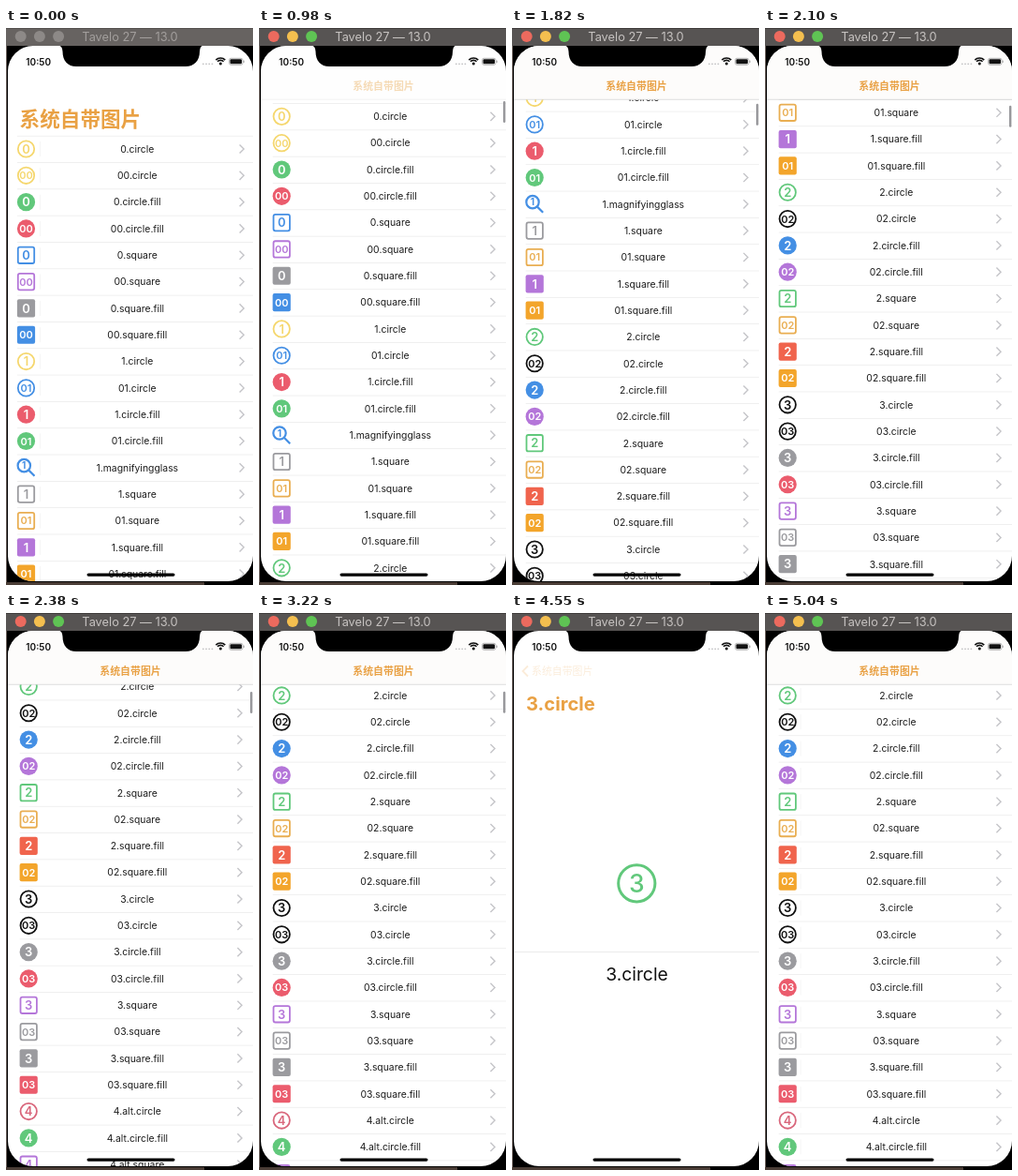
Recreate the animation shown at these times as an HTML page with a canvas. Size 264x594 px, loop 5.11 s.

```html
<!DOCTYPE html>
<html lang="zh">
<head>
<meta charset="utf-8">
<style>
html, body { margin: 0; width: 100%; height: 100%; overflow: hidden; background: #000; }
canvas { display: block; width: 264px; height: 594px; }
</style>
</head>
<body>
<canvas id="stage"></canvas>
<script>
const W = 264, H = 594, LOOP = 5110, STEP = 70;
const PITCH = 28.32, FIRST = 129, TAPPED = 25, ORANGE = '#e9a144';
const TITLE = '系统自带图片';
const LATIN = 'Inter, "Liberation Sans", sans-serif';
const CJK = '"Noto Sans CJK SC", "Noto Sans CJK", sans-serif';
const COLORS = {
  y: '#f5d76e', g: '#61c87b', r: '#eb5c6d', b: '#448fe4', p: '#b476d9', a: '#9b9b9f',
  o: '#e9ae52', O: '#f3a52b', v: '#f0644d', k: '#111', c: '#d9677c'
};
const PALETTE = 'yygrbpabybrgbaopOgkbpgovOkkarpaarcgpo';

const canvas = document.getElementById('stage');
const ctx = canvas.getContext('2d');
const dpr = window.devicePixelRatio || 1;
canvas.width = W * dpr;
canvas.height = H * dpr;
ctx.scale(dpr, dpr);

// Symbol list: each digit plain and zero-padded, in four shapes
const names = [];
for (let d = 0; d < 4; d++) {
  for (const shape of ['circle', 'circle.fill', 'square', 'square.fill']) {
    names.push(`${d}.${shape}`, `0${d}.${shape}`);
    if (d === 1 && shape === 'circle.fill') names.push('1.magnifyingglass');
  }
}
for (const shape of ['circle', 'circle.fill', 'square', 'square.fill']) names.push('4.alt.' + shape);

const clamp = (v, a = 0, b = 1) => Math.min(b, Math.max(a, v));
const ramp = (t, a, b) => clamp((t - a) / (b - a));
const easeOut = u => 1 - (1 - u) ** 3;

// Time, offset and speed (px/ms) at points of the drag
const DRAG = [[560, 0, 0], [1400, 126, .27], [1820, 281, .41], [2380, 532, 0], [3010, 522.5, 0]];
function scrollAt(t) {
  if (t <= DRAG[0][0]) return 0;
  for (let i = 1; i < DRAG.length; i++) {
    const [t0, y0, v0] = DRAG[i - 1], [t1, y1, v1] = DRAG[i];
    if (t > t1) continue;
    const d = t1 - t0, u = (t - t0) / d, w = 1 - u;
    return y0 * (1 + 2 * u) * w * w + v0 * d * u * w * w + y1 * u * u * (3 - 2 * u) - v1 * d * u * u * w;
  }
  return DRAG[DRAG.length - 1][1];
}

function rect(x, y, w, h, color) {
  ctx.fillStyle = color;
  ctx.fillRect(x, y, w, h);
}

function pill(x, y, w, h, r, color) {
  ctx.beginPath();
  ctx.roundRect(x, y, w, h, r);
  ctx.fillStyle = color;
  ctx.fill();
}

function dot(x, y, r, color) {
  ctx.beginPath();
  ctx.arc(x, y, r, 0, 7);
  ctx.fillStyle = color;
  ctx.fill();
}

function line(points, color, width) {
  ctx.beginPath();
  points.forEach(([x, y]) => ctx.lineTo(x, y));
  ctx.strokeStyle = color;
  ctx.lineWidth = width;
  ctx.stroke();
}

// Text centred vertically on the digit or ideograph height
function text(str, x, y, size, color, { weight = 400, align = 'center', family = LATIN } = {}) {
  ctx.font = `${weight} ${size}px ${family}`;
  ctx.textAlign = align;
  ctx.fillStyle = color;
  ctx.fillText(str, x, y + size * .365);
}

function faded(alpha, draw) {
  if (alpha <= 0) return;
  ctx.save();
  ctx.globalAlpha *= alpha;
  draw();
  ctx.restore();
}

function icon(name, x, y, color) {
  const digits = name.split('.')[0], fill = name.endsWith('fill');
  const lens = name.includes('magnifying');
  const size = digits.length > 1 ? 11 : 13;
  ctx.save();
  ctx.translate(x, y);
  ctx.beginPath();
  if (lens) {
    ctx.arc(-2.2, -2.2, 6.7, 0, 7);
    ctx.moveTo(2.8, 2.8);
    ctx.lineTo(9, 9);
  } else if (name.includes('circle')) {
    ctx.arc(0, 0, fill ? 9.6 : 8.7, 0, 7);
  } else {
    const r = fill ? 9.6 : 8.7;
    ctx.roundRect(-r, -r, 2 * r, 2 * r, 2);
  }
  ctx.fillStyle = ctx.strokeStyle = color;
  ctx.lineWidth = lens ? 2.2 : 1.8;
  fill ? ctx.fill() : ctx.stroke();
  if (lens) text(digits, -2.4, -2.2, 10, color, { weight: 700 });
  else text(digits, 0, 0, size, fill ? '#fff' : color, { weight: 600 });
  ctx.restore();
}

function list(t, scroll, highlight) {
  const settled = t < 560 || t > 4900;
  const shift = 2.7 * ramp(scroll, 0, 4);
  const navBottom = Math.max(76, 114 - scroll);
  rect(0, 0, W, H, '#fff');
  ctx.save();
  ctx.beginPath();
  ctx.rect(0, navBottom, W, H);
  ctx.clip();
  rect(12 + shift, FIRST - PITCH / 2 - scroll, W, .7, '#e9e9e9');
  names.forEach((name, i) => {
    const y = FIRST + i * PITCH - scroll;
    if (y < 50 || y > 615) return;
    if (i === TAPPED) faded(highlight, () => rect(0, y - PITCH / 2, W, PITCH, '#d9d9dd'));
    icon(name, 21.5 + shift, y, COLORS[PALETTE[i]]);
    if (settled) rect(36 + shift * .6, y - 8, 1, 16, '#f5f5f5');
    text(name, 140.3, y, 10.4, '#1c1c1c');
    const cx = 252 - shift * .8;
    line([[cx - 2.4, y - 4.6], [cx + 2.2, y], [cx - 2.4, y + 4.6]], '#c5c5c9', 1.4);
    rect(12 + shift, y + PITCH / 2, W, .7, '#e9e9e9');
  });
  ctx.restore();
  faded(ramp(t, 560, 700) * (1 - ramp(t, 3220, 3430)), () =>
    pill(261, 77.5 + scroll * .012, 2.4, 23, 1.2, '#98989c'));
  // Large title slides away under the bar
  ctx.save();
  ctx.beginPath();
  ctx.rect(0, 76, W, H);
  ctx.clip();
  if (scroll < 40) text(TITLE, 14.6, 97 - scroll, 21.6, ORANGE, { weight: 700, align: 'left', family: CJK });
  ctx.restore();
}

function detail() {
  rect(0, 0, W, H, '#fff');
  text('3.circle', 15, 97, 20.2, ORANGE, { weight: 700, align: 'left' });
  ctx.beginPath();
  ctx.arc(133.3, 288.3, 19.6, 0, 7);
  ctx.strokeStyle = COLORS.g;
  ctx.lineWidth = 3;
  ctx.stroke();
  text('3', 133.3, 288.5, 26.5, COLORS.g, { weight: 500 });
  rect(2, 361, W, .8, '#e6e6e6');
  text('3.circle', 133.5, 385, 19.3, '#111');
}

function navBar(t, scroll, p) {
  const collapsed = ramp(scroll, 30, 42);
  faded(collapsed * (1 - p), () => {
    rect(0, 19, W, 57, '#fdfcfb');
    rect(0, 75.8, W, .8, '#d5d5d5');
    text(TITLE, 133 - 79 * p, 62, 10.9, ORANGE, { weight: 700, family: CJK });
  });
  const pressed = t >= 4480 ? .2 : 1;
  faded(p * pressed, () => {
    const x = 60 * (1 - p);
    line([[17, 56.5], [11.5, 62], [17, 67.5]], ORANGE, 1.8);
    text(TITLE, 21 + x, 62, 10.9, ORANGE, { align: 'left', family: CJK });
  });
}

function statusBar() {
  text('10:50', 34.7, 36, 10, '#111', { weight: 600 });
  for (let i = 0; i < 4; i++) dot(210.8 + i * 3.2, 38.3, .9, '#c2c2c4');
  for (const r of [7, 4.6]) {
    ctx.beginPath();
    ctx.arc(229.3, 39, r, -Math.PI * .75, -Math.PI * .25);
    ctx.strokeStyle = '#111';
    ctx.lineWidth = 1.7;
    ctx.stroke();
  }
  dot(229.3, 38, 1.5, '#111');
  ctx.beginPath();
  ctx.roundRect(238.5, 32.3, 14.5, 7, 2);
  ctx.strokeStyle = '#999';
  ctx.lineWidth = .7;
  ctx.stroke();
  pill(239.5, 33.3, 12.5, 5, 1.2, '#111');
  pill(253.6, 34.6, 1, 2.4, .5, '#999');
}

function notch() {
  ctx.beginPath();
  ctx.moveTo(55, 18);
  ctx.quadraticCurveTo(60.5, 19, 60.5, 25);
  ctx.bezierCurveTo(60.5, 35, 66, 41, 75, 41);
  ctx.lineTo(192, 41);
  ctx.bezierCurveTo(201, 41, 207, 35, 207, 25);
  ctx.quadraticCurveTo(207, 19, 212, 18);
  ctx.fillStyle = '#000';
  ctx.fill();
}

function titleBar(active) {
  rect(0, 0, W, 19, active ? '#575453' : '#676361');
  rect(0, 0, W, 1, active ? '#403d3c' : '#55514f');
  const lights = active ? ['#ec6a5e', '#f4bf4f', '#5fc454'] : Array(3).fill('#8d8987');
  lights.forEach((color, i) => dot(15.7 + i * 20.2, 9, 6, color));
  text('Tavelo 27 — 13.0', 132.5, 9.5, 12.8, active ? '#c6c2c0' : '#a29e9c');
}

function page(x, draw) {
  ctx.save();
  ctx.translate(x, 0);
  draw();
  ctx.restore();
}

function render(t) {
  const scroll = scrollAt(t);
  const push = easeOut(ramp(t, 3270, 3690));
  const pop = easeOut(ramp(t, 4570, 4970));
  const p = push - pop;
  const highlight = pop > 0 ? p : t > 3230 ? 1 : 0;

  // Desktop strip around the device
  rect(0, 0, W, H, '#000');
  rect(0, 19, 1, H, '#6b605c');
  rect(0, 591, 212, 3, '#4a3d36');
  ctx.save();
  ctx.beginPath();
  ctx.roundRect(2, 19, 262, 571, 27);
  ctx.clip();
  if (p < 1) {
    page(-79 * p, () => list(t, scroll, highlight));
    faded(.08 * p, () => rect(0, 0, W, H, '#000'));
  }
  if (p > 0) page(W * (1 - p), detail);
  navBar(t, scroll, p);
  statusBar();
  pill(86.5, 581.5, 94, 3.2, 1.6, '#000');
  ctx.restore();
  notch();
  titleBar(t >= 560);
}

function tick() {
  const t = performance.now() % LOOP;
  render(Math.floor(t / STEP) * STEP);
  requestAnimationFrame(tick);
}
tick();
</script>
</body>
</html>
```
